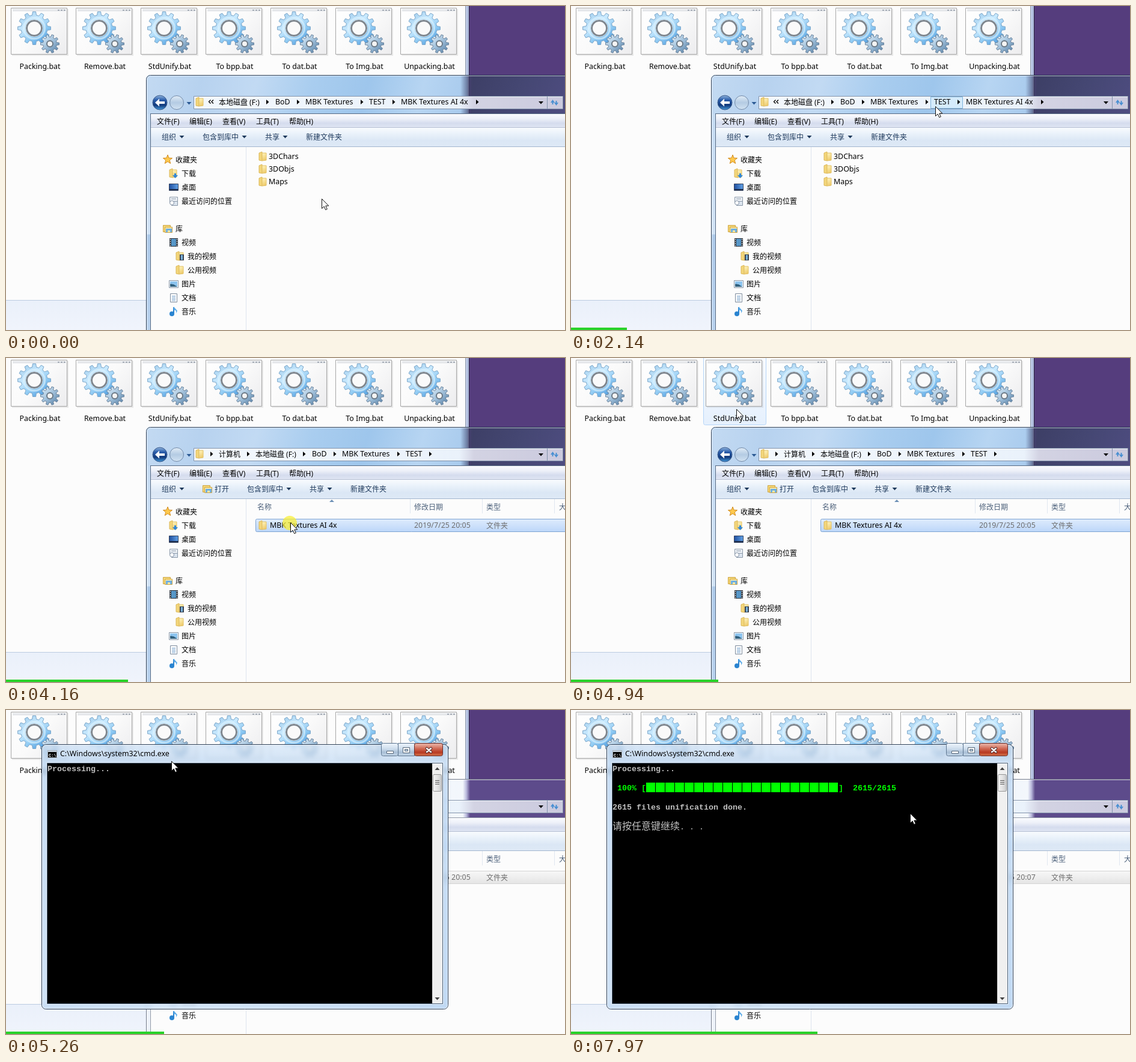
These frames come from a looping animation (930x540 px, 8 s). An HTML page with a canvas:

```html
<!DOCTYPE html>
<html lang="zh">
<head>
<meta charset="utf-8">
<title>Batch unify demo</title>
<style>
html, body { margin: 0; width: 100%; height: 100%; overflow: hidden; background: #fcfcfc; }
canvas { display: block; }
</style>
</head>
<body>
<canvas id="stage" width="930" height="540"></canvas>
<script>
const canvas = document.getElementById('stage');
const c = canvas.getContext('2d');
const LOOP = 8000, OPEN_FOLDER = 2500, FOLDER_READY = 3000, CONSOLE = 5060;
const UI = '"Noto Sans", "Noto Sans CJK SC", "Noto Sans CJK", sans-serif';
const MONO = '"Liberation Mono", "Noto Sans CJK SC", "Noto Sans CJK", monospace';

// ---------- helpers ----------
const clamp = v => Math.max(0, Math.min(1, v));
const ease = v => v * v * (3 - 2 * v);

function ramp(x0, y0, x1, y1, ...stops) {
  const g = c.createLinearGradient(x0, y0, x1, y1);
  stops.forEach((s, i) => Array.isArray(s) ? g.addColorStop(s[0], s[1]) : g.addColorStop(i / (stops.length - 1), s));
  return g;
}
const down = (y, h, ...stops) => ramp(0, y, 0, y + h, ...stops);

function rect(x, y, w, h, fill) {
  c.fillStyle = fill;
  c.fillRect(x, y, w, h);
}

function box(x, y, w, h, fill, stroke, radius = 0) {
  c.beginPath();
  c.roundRect(x + .5, y + .5, w - 1, h - 1, radius);
  if (fill) { c.fillStyle = fill; c.fill(); }
  if (stroke) { c.lineWidth = 1; c.strokeStyle = stroke; c.stroke(); }
}

function poly(points, fill, stroke, width = 1) {
  c.beginPath();
  for (let i = 0; i < points.length; i += 2) c.lineTo(points[i], points[i + 1]);
  c.closePath();
  if (fill) { c.fillStyle = fill; c.fill(); }
  if (stroke) { c.lineWidth = width; c.strokeStyle = stroke; c.stroke(); }
}

function disc(x, y, r, fill, stroke, width = 1) {
  c.beginPath();
  c.arc(x, y, r, 0, 7);
  if (fill) { c.fillStyle = fill; c.fill(); }
  if (stroke) { c.lineWidth = width; c.strokeStyle = stroke; c.stroke(); }
}

function label(s, x, y, color = '#000', align = 'left') {
  const cjk = /[\u4e00-\u9fff]/.test(s);
  c.font = `${cjk ? 12 : 12.4}px ${UI}`;
  c.textAlign = align;
  c.fillStyle = color;
  c.fillText(s, x, y + (cjk ? 5 : 4));
}

function mono(s, x, y, color = '#c0c0c0', font = 'bold 13.33px') {
  c.font = `${font} ${MONO}`;
  c.textAlign = 'left';
  c.fillStyle = color;
  c.fillText(s, x, y);
}

const downArrow = (x, y, color = '#1e395b') => poly([x - 4, y - 2, x + 4, y - 2, x, y + 2.5], color);
const rightArrow = (x, y) => poly([x - 2, y - 4, x + 2.5, y, x - 2, y + 4], '#000');

// ---------- batch file icons ----------
function gear(x, y, teeth, outer, inner, fill, stroke) {
  const pts = [], step = Math.PI * 2 / teeth;
  for (let i = 0; i < teeth; i++) {
    [[-.3, inner], [-.18, outer], [.18, outer], [.3, inner]].forEach(([k, r]) => {
      const a = (i + k) * step;
      pts.push(x + r * Math.cos(a), y + r * Math.sin(a));
    });
  }
  poly(pts, fill, stroke);
}

function batchIcon(x) {
  rect(x + 1, 5, 94, 78, 'rgba(0,0,0,.08)');
  box(x - 1, 3, 94, 78, ramp(x, 3, x + 93, 81, '#fff', '#fafafa', '#ececee'), '#a6a6a6');
  rect(x + 2, 5, 88, 4, '#e6e8eb');
  for (let i = 0; i < 3; i++) rect(x + 77 + i * 5, 6, 3, 2, '#a5acb6');
  const gx = x + 38, gy = 37, sx = x + 64, sy = 63;
  gear(gx, gy, 12, 27.5, 22, ramp(gx - 18, gy - 24, gx + 18, gy + 26, '#a6d0ee', '#c9eaff', '#8fcaf3', '#4c9ade'), '#7ba6c9');
  disc(gx, gy, 17.5, null, 'rgba(225,245,255,.6)', 3);
  disc(gx, gy, 12.5, '#fafafa', '#7d858d', 3);
  disc(gx, gy, 14.4, null, '#cbd6de');
  gear(sx, sy, 10, 15.5, 11.5, ramp(sx - 12, sy - 12, sx + 12, sy + 14, '#d9ebf8', '#9dbdd8', '#5b83a8'), '#66809a');
  disc(sx, sy, 5, '#f4f4f4', '#6c7985', 2);
}

function desktop(hoverUnify) {
  rect(0, 0, 930, 540, '#fcfcfc');
  rect(0, 490, 765, 50, down(490, 50, '#eaf0fa', '#f0f4fc'));
  rect(0, 490, 765, 1, '#bccce0');
  rect(770, 0, 160, 540, '#553d7d');
  rect(764, 0, 1, 540, '#8d96a8');
  rect(765, 0, 4, 540, ramp(765, 0, 769, 0, '#c9d6ec', '#a5b2d8'));
  rect(769, 0, 1, 540, '#b9c3e2');
  rect(770, 0, 1, 540, '#25203e');
  if (hoverUnify) box(220, -4, 105, 116, down(0, 111, '#f8fbff', '#e5f0fd'), '#b5d5f8', 3);
  ['Packing', 'Remove', 'StdUnify', 'To bpp', 'To dat', 'To Img', 'Unpacking'].forEach((name, i) => {
    batchIcon(9 + 108 * i);
    label(name + '.bat', 56.5 + 108 * i, 101, '#000', 'center');
  });
}

// ---------- explorer ----------
function folder(x, y) {
  poly([x - 6, y - 6, x - 1, y - 8, x - 1, y + 7, x - 6, y + 6], '#f3d67b', '#dcb85a');
  poly([x - 1, y - 6, x + 6, y - 6, x + 6, y + 6, x - 1, y + 7], ramp(x, y - 6, x + 6, y + 6, '#fff4bd', '#ecc765'), '#e2c064');
}

function libraryIcon(x, y) {
  box(x - 8, y - 6, 13, 12, '#f5d878', '#cda444');
  box(x - 5, y - 3, 13, 10, '#fbe9a5', '#cda444');
  rect(x - 3, y, 10, 6, '#6fb0e2');
  rect(x, y + 3, 4, 3, '#fbe9a5');
}

const sideIcons = {
  star(x, y) {
    const pts = [];
    for (let i = 0; i < 10; i++) {
      const a = i * Math.PI / 5 - Math.PI / 2, r = i % 2 ? 3.4 : 8;
      pts.push(x + r * Math.cos(a), y + r * Math.sin(a));
    }
    poly(pts, '#ffc94d', '#d18b1f');
  },
  download(x, y) {
    folder(x - 1, y);
    poly([x + 1, y, x + 4, y, x + 4, y + 3, x + 7, y + 3, x + 2.5, y + 8, x - 2, y + 3, x + 1, y + 3], '#2f86d8');
  },
  screen(x, y) {
    box(x - 8, y - 6, 16, 12, ramp(x - 8, y, x + 8, y, '#1d4c9c', '#63a4e8'), '#33415c');
    rect(x - 7, y + 3, 14, 2, '#203050');
  },
  recent(x, y) {
    box(x - 7, y - 7, 14, 10, '#eef2f7', '#8b98a8');
    rect(x - 4, y - 4, 8, 1, '#8b98a8');
    box(x - 4, y, 11, 8, '#dbe4ee', '#8b98a8');
    disc(x - 3, y + 3, 3.5, '#fff', '#7f8fa3');
  },
  library: libraryIcon,
  film(x, y) {
    rect(x - 7, y - 7, 14, 14, '#2b3038');
    rect(x - 4, y - 6, 8, 12, '#5797c8');
    for (let i = 0; i < 4; i++) {
      rect(x - 6, y - 6 + i * 3.5, 1, 2, '#fff');
      rect(x + 5, y - 6 + i * 3.5, 1, 2, '#fff');
    }
  },
  filmFolder(x, y) { folder(x, y); rect(x, y - 3, 7, 10, '#3b4350'); rect(x + 2, y - 2, 3, 8, '#79b3dc'); },
  folder,
  picture(x, y) {
    box(x - 8, y - 6, 16, 13, '#fff', '#8494a5');
    rect(x - 6, y - 4, 12, 9, '#8cc4ef');
    poly([x - 6, y + 5, x - 6, y, x, y + 1, x + 6, y + 5], '#33627f');
  },
  page(x, y) {
    box(x - 6, y - 7, 12, 15, '#fff', '#7d8b9c');
    for (let i = 0; i < 4; i++) rect(x - 3, y - 3 + i * 2.5, 6, 1, '#6f9cc8');
  },
  note(x, y) {
    disc(x - 3, y + 4, 4, '#2a84d0');
    rect(x - 1, y - 7, 2, 11, '#2a84d0');
    poly([x, y - 8, x + 6, y - 1, x + 4, y + 3, x + 4, y - 1, x, y - 3], '#58a9e8');
  }
};
const sidebar = [
  ['star', '收藏夹', 0, 255], ['download', '下载', 1, 278], ['screen', '桌面', 1, 301], ['recent', '最近访问的位置', 1, 324],
  ['library', '库', 0, 370], ['film', '视频', 1, 393], ['filmFolder', '我的视频', 2, 416], ['folder', '公用视频', 2, 439],
  ['picture', '图片', 1, 462], ['page', '文档', 1, 485], ['note', '音乐', 1, 508]
];

function glassFrame(active) {
  c.save();
  c.beginPath();
  c.roundRect(233, 115, 720, 450, 7);
  c.clip();
  const left = active
    ? ['#c3daf2', '#b7d2ef', '#c2daf3', '#a9cdef', '#9ec6ec', '#b7d5f2', '#a5c8ec']
    : ['#eef4fb', '#f3f7fc'];
  rect(233, 115, 535, 65, ramp(233, 115, 760, 245, ...left));
  rect(233, 180, 8, 360, active
    ? ramp(0, 180, 0, 540, [0, '#c6dcf3'], [.555, '#d3e4f6'], [.56, '#afcbea'], [1, '#b9d2ee'])
    : '#eef3fa');
  rect(756, 115, 174, 65, active
    ? ramp(756, 0, 776, 0, 'rgba(62,64,103,0)', 'rgba(62,64,103,1)')
    : ramp(760, 0, 772, 0, '#f3f7fc', '#b9b9dc', '#5d4b8b'));
  if (active) rect(776, 116, 154, 64, ramp(776, 116, 930, 180, '#3d3f66', '#454773', '#4e4c80'));
  c.restore();
  box(233, 115, 720, 450, null, active ? '#263a54' : '#71798a', 7);
  box(234, 116, 720, 450, null, 'rgba(255,255,255,.6)', 6);
  rect(240, 180, 1, 360, active ? '#566a84' : '#929aa8');
  rect(240, 179, 690, 1, active ? '#566a84' : '#929aa8');
}

function navigation() {
  disc(256, 161, 12, ramp(0, 148, 0, 174, '#9dbfe3', '#2a5dab', '#123a7c', '#4ba6e6'), '#3d5c8c');
  poly([248, 161, 255, 154.5, 255, 159, 264, 159, 264, 163, 255, 163, 255, 167.5], '#fff');
  disc(284, 161, 11.5, ramp(0, 149, 0, 173, '#e3eef8', '#b4cbe3', '#d3e4f3'), '#7189a8');
  downArrow(304.5, 162, '#2c5a94');
}

function refreshIcon() {
  const blue = '#4a90d2';
  poly([906, 161, 909.5, 156, 913, 161], blue);
  poly([912, 161, 915.5, 166, 919, 161], blue);
  rect(908.5, 161, 2, 3, blue);
  rect(914.5, 158, 2, 3, blue);
}

function addressBar(detail, ready, pointer, time) {
  box(312, 150, 615, 22, ramp(312, 0, 926, 0, [0, '#f3f8fd'], [.72, '#eaf2fb'], [.76, '#d3d3e3'], [1, '#cbcade']), '#8293ab');
  rect(313, 151, 613, 1, 'rgba(255,255,255,.7)');
  rect(900, 151, 1, 20, '#8293ab');
  downArrow(890, 161, '#000');
  refreshIcon();
  folder(322, 160);
  const overBar = pointer.y > 150 && pointer.y < 172;
  if (detail && !ready) {
    box(661, 151, 36, 20, 'rgba(255,255,255,.35)', '#c3d3e6');
  } else if (overBar) {
    if (!detail && pointer.x > 598 && pointer.x < 637) box(598, 151, 54, 20, '#d5ebfb', '#7db4dc');
    if (detail && time > 3070 && pointer.x > 554 && pointer.x < 661) box(555, 151, 107, 20, '#d5ebfb', '#7db4dc');
  }
  const crumbs = detail
    ? [['计算机', 354, 403], ['本地磁盘 (F:)', 415, 496], ['BoD', 509, 547], ['MBK Textures', 559, 653], ['TEST', 665, ready ? 706 : 0]]
    : [['本地磁盘 (F:)', 354, 435], ['BoD', 448, 486], ['MBK Textures', 498, 592], ['TEST', 604, 645], ['MBK Textures AI 4x', 657, 784]];
  if (detail) {
    rightArrow(342, 160);
  } else {
    c.lineWidth = 1.4;
    c.strokeStyle = '#000';
    c.beginPath();
    [340.5, 345].forEach(x => { c.moveTo(x, 156.5); c.lineTo(x - 3, 159.5); c.lineTo(x, 162.5); });
    c.stroke();
  }
  crumbs.forEach(([name, x, arrow]) => {
    label(name, x, 160);
    if (arrow) rightArrow(arrow, 160);
  });
}

function bars(detail) {
  rect(241, 180, 689, 23, down(180, 23, '#fafbfe', '#eef1f9', '#d5dcee', '#e0e6f3'));
  rect(241, 202, 689, 1, '#b5bfd4');
  rect(241, 203, 689, 32, down(203, 32, '#f8fbfe', '#e9f1fa', '#dbe7f5', '#dee9f6'));
  rect(241, 234, 689, 1, '#a3b6cf');
  [['文件(F)', 251], ['编辑(E)', 305], ['查看(V)', 360], ['工具(T)', 416], ['帮助(H)', 471]].forEach(([s, x]) => label(s, x, 192));
  const shift = detail ? 74 : 0, ink = '#1e395b';
  label('组织', 259, 218, ink);
  downArrow(292.5, 218);
  if (detail) {
    libraryIcon(335, 218);
    label('打开', 347, 218, ink);
  }
  label('包含到库中', 327 + shift, 218, ink);
  downArrow(396.5 + shift, 218);
  label('共享', 431 + shift, 218, ink);
  downArrow(464.5 + shift, 218);
  label('新建文件夹', 499 + shift, 218, ink);
}

function folderList(pointer) {
  [['3DChars', 77], ['3DObjs', 70], ['Maps', 60]].forEach(([name, width], i) => {
    const y = 241 + i * 21;
    const over = pointer.x > 415 && pointer.x < 415 + width && pointer.y >= y && pointer.y < y + 21;
    if (over) box(415, y, width, 20, down(y, 20, '#fbfdff', '#ecf4fd'), '#b8d6f8', 2);
    folder(427, y + 10);
    label(name, 437, y + 10);
  });
}

function detailList(pointer, active, time) {
  const ink = '#4c607a', headHover = time > 3070 && time < 3850 && pointer.y > 235 && pointer.y < 262;
  if (headHover) box(415, 235, 258, 27, down(235, 27, '#f3f9fe', '#e0f0fc'), '#cfe3f3');
  [672, 792, 912].forEach(x => rect(x, 235, 1, 24, '#e0e7f0'));
  [['名称', 418], ['修改日期', 679], ['类型', 799], ['大小', 920]].forEach(([s, x]) => label(s, x, 248, ink));
  poly([538, 240, 542, 236, 546, 240], '#6b8fb5');
  const fill = active ? down(268, 22, '#dfecfd', '#bcd6f9') : down(268, 22, '#f8f8f8', '#e4e4e4');
  box(415, 268, 540, 22, fill, active ? '#7ea4d2' : '#d4d4d4', 2);
  folder(427, 279);
  label('MBK Textures AI 4x', 439, 279);
  label('2019/7/25 20:0' + (time < 5850 ? 5 : 7), 679, 279, '#6d6d6d');
  label('文件夹', 799, 279, '#6d6d6d');
}

function explorer(time, pointer) {
  const detail = time >= OPEN_FOLDER, active = time < CONSOLE;
  glassFrame(active);
  navigation();
  addressBar(detail, time >= FOLDER_READY, pointer, time);
  rect(241, 235, 689, 305, '#fcfcfc');
  bars(detail);
  rect(399, 235, 1, 305, '#dde4ee');
  sidebar.forEach(([icon, name, depth, y]) => {
    sideIcons[icon](269 + depth * 10, y + 1);
    label(name, 282 + depth * 10, y + .5);
  });
  if (detail) detailList(pointer, active, time);
  else folderList(pointer);
}

// ---------- console ----------
function captionButtons() {
  const glass = down(58, 19, '#e6eff8', '#cfdeed', '#a9bfd6', '#c8daeb');
  box(624, 55, 29, 22, glass, '#5d7590', 3);
  box(652, 55, 28, 22, glass, '#5d7590');
  box(679, 55, 48, 22, down(58, 19, '#e5a698', '#d06a55', '#b83a22', '#d77a50'), '#6b2c28', 3);
  box(633, 68, 12, 5, '#fff', '#56677a');
  box(660, 62, 12, 10, '#fff', '#56677a');
  box(663, 65, 6, 4, '#b9cbdd', '#56677a');
  c.lineCap = 'round';
  [['#5a3030', 4.5], ['#fff', 2.4]].forEach(([color, width]) => {
    c.beginPath();
    c.moveTo(700, 64); c.lineTo(707, 70);
    c.moveTo(707, 64); c.lineTo(700, 70);
    c.strokeStyle = color; c.lineWidth = width; c.stroke();
  });
}

function scrollBar() {
  rect(709, 89, 17, 400, '#f0f0f0');
  rect(709, 89, 1, 400, '#e2e2e2');
  poly([713.5, 100, 721.5, 100, 717.5, 95.5], '#444');
  downArrow(717.5, 481, '#444');
  box(710, 107, 15, 29, ramp(710, 0, 725, 0, '#f6f6f6', '#e4e4e4', '#c9cacc'), '#959595', 2);
  for (let i = 0; i < 3; i++) rect(714, 117 + i * 3, 7, 1, '#555');
}

function progress(time) {
  const p = clamp((time - 5340) / 2300), lime = '#00ff00';
  mono('Processing...', 69, 102);
  if (time < 5340) return;
  mono(String(Math.floor(p * 100)).padStart(3) + '% [', 77, 134, lime);
  for (let i = 0; i < Math.floor(p * 20); i++) rect(125 + i * 16, 121, 15, 16, lime);
  mono(']', 445, 134, lime);
  mono(String(Math.floor(p * 2615)).padStart(4) + '/2615', 469, 134, lime);
  if (p < 1) return;
  mono('2615 files unification done.', 69, 166);
  mono('请按任意键继续', 69, 199, '#c0c0c0', '16px');
  mono('. . .', 181, 199, '#c0c0c0', '13.33px');
}

function consoleWindow(time) {
  c.save();
  c.globalAlpha = clamp((time - CONSOLE) / 130);
  c.save();
  c.beginPath();
  c.roundRect(60, 58, 675, 440, 7);
  c.clip();
  c.filter = 'blur(3px)';
  c.drawImage(canvas, 0, 0);
  c.filter = 'none';
  rect(60, 58, 675, 440, ramp(60, 58, 735, 498, 'rgba(178,208,240,.72)', 'rgba(196,220,245,.7)', 'rgba(172,205,240,.75)'));
  rect(60, 58, 675, 30, down(58, 30, 'rgba(255,255,255,.3)', 'rgba(255,255,255,0)'));
  c.restore();
  box(59, 57, 677, 442, null, '#2b3f58', 7);
  box(60, 58, 675, 440, null, 'rgba(255,255,255,.65)', 6);
  box(67, 87, 661, 404, null, 'rgba(255,255,255,.6)');
  box(68, 88, 659, 402, '#000', '#4a6078');
  box(69, 67, 16, 13, '#000', '#a8b0b8');
  rect(70, 68, 14, 2, '#c8d4e0');
  c.font = `bold 7px ${MONO}`;
  c.fillStyle = '#fff';
  c.textAlign = 'left';
  c.fillText('C:\\.', 71, 77.5);
  label('C:\\Windows\\system32\\cmd.exe', 90, 73);
  captionButtons();
  scrollBar();
  progress(time);
  c.restore();
}

// ---------- pointer ----------
const route = [
  [0, 525, 321], [500, 525, 321], [1080, 463, 258], [1500, 463, 258], [2140, 606, 167], [3070, 606, 167],
  [3800, 483, 280], [3930, 483, 280], [4130, 473, 274], [4260, 473, 274], [4700, 275, 85],
  [6470, 275, 85], [7240, 564, 172], [LOOP, 564, 172]
];
const clicks = [[OPEN_FOLDER - 120, OPEN_FOLDER], [4090, 4240], [4990, CONSOLE]];

function pointerAt(time) {
  const i = route.findIndex(k => k[0] > time);
  const [t0, x0, y0] = route[i - 1], [t1, x1, y1] = route[i];
  const k = ease((time - t0) / (t1 - t0));
  return { x: x0 + (x1 - x0) * k, y: y0 + (y1 - y0) * k };
}

function drawPointer({ x, y }, time) {
  if (clicks.some(([from, to]) => time >= from && time < to)) disc(x - 1, y + 1, 12, 'rgba(248,238,50,.72)');
  const shape = [0, 0, 0, 16, 3.7, 12.5, 6.2, 18.2, 8.8, 17, 6.3, 11.5, 11.3, 11.5];
  poly(shape.map((v, i) => v + Math.round(i % 2 ? y : x) + .5), '#fff', '#111');
}

// ---------- playback ----------
function draw(time) {
  const pointer = pointerAt(time);
  c.clearRect(0, 0, 930, 540);
  desktop(time < CONSOLE && pointer.y < 111 && pointer.x > 220 && pointer.x < 325);
  explorer(time, pointer);
  if (time >= CONSOLE) consoleWindow(time);
  if (time >= 500) rect(0, 536, Math.round((time - 443) * .0545), 4, '#2ad22a');
  drawPointer(pointer, time);
}

const start = performance.now();
function tick() {
  draw((performance.now() - start) % LOOP);
  requestAnimationFrame(tick);
}
tick();
</script>
</body>
</html>
```
